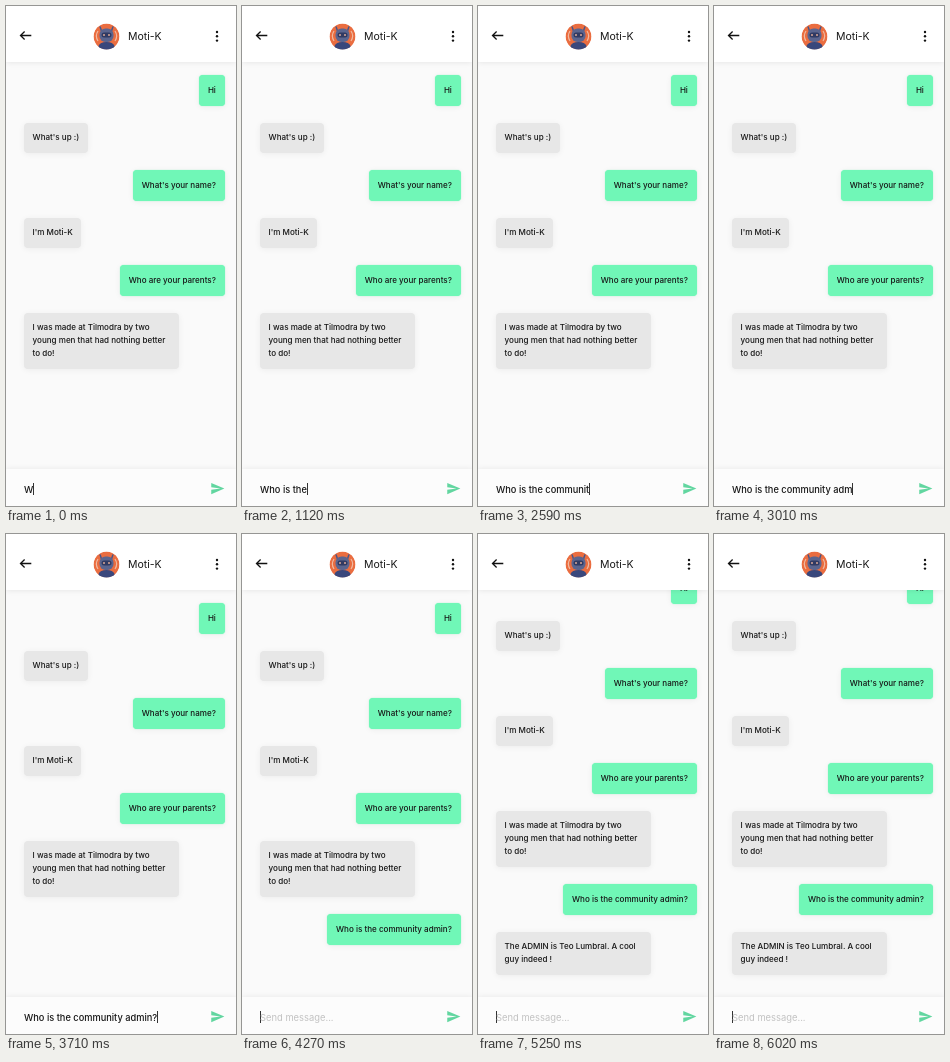
These frames come from a looping animation (230x500 px, 6.16 s). An HTML page:

```html
<!DOCTYPE html>
<html lang="en">
<head>
<meta charset="utf-8">
<title>Chat</title>
<style>
  html, body { margin: 0; width: 100%; height: 100%; overflow: hidden; }
  body { position: relative; background: #fafafa; color: #161616; font: 500 8.05px/13px Inter, "Open Sans", sans-serif; }
  header, footer, #log, .field, #scrollbar, svg { position: absolute; }
  header, footer { left: 0; width: 230px; }
  header { top: 0; height: 56px; background: #fff; box-shadow: 0 0 6px rgba(0, 0, 0, .1); }
  footer { top: 463px; height: 37px; background: #fcfcfc; box-shadow: 0 0 6px rgba(0, 0, 0, .08); }
  header svg { left: 0; top: 0; }
  h1 { position: absolute; left: 122px; top: 23px; margin: 0; font-size: 10.5px; line-height: 15px; font-weight: 400; }
  #log { left: 18px; top: 69px; width: 200.5px; display: flex; flex-direction: column; align-items: flex-start; gap: 17px; }
  #log p { margin: 0; padding: 8.75px 8.6px; border-radius: 4px; box-sizing: border-box; white-space: pre;
    background: #e7e7e7; box-shadow: 0 1px 6px rgba(0, 0, 0, .06); }
  #log .me { align-self: flex-end; background: #70f7b7; box-shadow: 0 0 1px #70f7b7, 0 1px 6px rgba(0, 0, 0, .06); }
  #log .wide { width: 155px; }
  .field { left: 18px; top: 14px; height: 12px; display: flex; align-items: center; white-space: pre; font-size: 9.25px; }
  #caret { width: 1px; height: 12px; margin-right: -1px; background: #333; }
  #hint { color: #c2c2c2; font-weight: 400; font-size: 9.4px; }
  #scrollbar { left: 227px; top: 29px; width: 2px; height: 467px; border-radius: 1px; background: #c8c8c8; }
</style>
</head>
<body>
<main id="log">
  <p class="me">Hi</p>
  <p>What's up :)</p>
  <p class="me">What's your name?</p>
  <p>I'm Moti-K</p>
  <p class="me">Who are your parents?</p>
  <p class="wide">I was made at Tilmodra by two
young men that had nothing better
to do!</p>
  <p class="me" id="question"></p>
  <p class="wide" id="reply">The ADMIN is Teo Lumbral. A cool
guy indeed !</p>
</main>

<header>
  <svg width="230" height="56" viewBox="0 0 230 56">
    <path d="M25.3 29.500H14.800M18.600 25.500L14.500 29.500L18.600 33.500" fill="none" stroke="#111" stroke-width="1.3"/>
    <g fill="#111"><circle cx="211" cy="26" r="1.2"/><circle cx="211" cy="30.3" r="1.2"/><circle cx="211" cy="34.6" r="1.2"/></g>
    <clipPath id="disc"><circle cx="100.5" cy="30.5" r="13"/></clipPath>
    <g clip-path="url(#disc)">
      <circle cx="100.5" cy="30.5" r="13" fill="#ea6d40"/>
      <path d="M92 35A9 9 0 0 1 92 25M109 25A9 9 0 0 1 109 35" fill="none" stroke="#f0b9a0" stroke-width="1.2"/>
      <path d="M92.500 44V40Q94 36 100.500 36T108.500 40V44Z" fill="#39477c"/>
      <path d="M95.500 25L94 20.500M105.500 25L107 20.500" stroke="#4b5686" stroke-width="1.5"/>
      <rect x="93.500" y="22.500" width="14" height="13.500" rx="6" fill="#5b658f"/>
      <rect x="95.500" y="26.500" width="10" height="5" rx="2.5" fill="#303a63"/>
      <circle cx="98" cy="29" r="1" fill="#d9a696"/><circle cx="103" cy="29" r="1" fill="#d9a696"/>
    </g>
  </svg>
  <h1>Moti-K</h1>
</header>

<footer>
  <div class="field"><span id="typed"></span><span id="caret"></span><span id="hint">Send message...</span></div>
  <svg style="left:203.8px;top:11.6px" width="15" height="15" viewBox="0 0 24 24"><path d="M2 21L23 12L2 3V10L17 12L2 14Z" fill="#62d6a0"/></svg>
</footer>
<div id="scrollbar"></div>

<script>
  const LOOP = 6160, SENT = 3920, REPLIED = 4410, SCROLL = 30;
  const MESSAGE = "Who is the community admin?";
  // [time, number of letters typed]
  const KEYS = [
    [0, 1], [70, 2], [280, 3], [420, 4], [560, 6], [770, 7], [840, 8], [980, 9], [1050, 10],
    [1190, 11], [1610, 12], [1680, 13], [1820, 14], [1960, 15], [2100, 16], [2310, 17],
    [2450, 18], [2590, 19], [2660, 20], [2730, 21], [2870, 22], [2940, 23], [3010, 24],
    [3150, 25], [3290, 26], [3640, 27]
  ];
  const BLINKS = [[0, REPLIED], [4970, 5460], [6020, LOOP]];

  const el = id => document.getElementById(id);
  const show = (id, on) => { el(id).style.visibility = on ? "visible" : "hidden"; };
  const start = performance.now();
  el("question").textContent = MESSAGE;

  function draw() {
    const t = (performance.now() - start) % LOOP;
    const sent = t >= SENT, replied = t >= REPLIED;
    const letters = KEYS.filter(([time]) => time <= t).pop()[1];
    el("typed").textContent = sent ? "" : MESSAGE.slice(0, letters);
    show("hint", sent);
    show("question", sent);
    show("reply", replied);
    show("caret", BLINKS.some(([on, off]) => t >= on && t < off));
    el("log").style.transform = replied ? `translateY(${-SCROLL}px)` : "none";
    el("scrollbar").style.opacity = replied ? Math.min(1, Math.max(0, (4970 - t) / 270)) : 0;
    requestAnimationFrame(draw);
  }
  draw();
</script>
</body>
</html>
```
